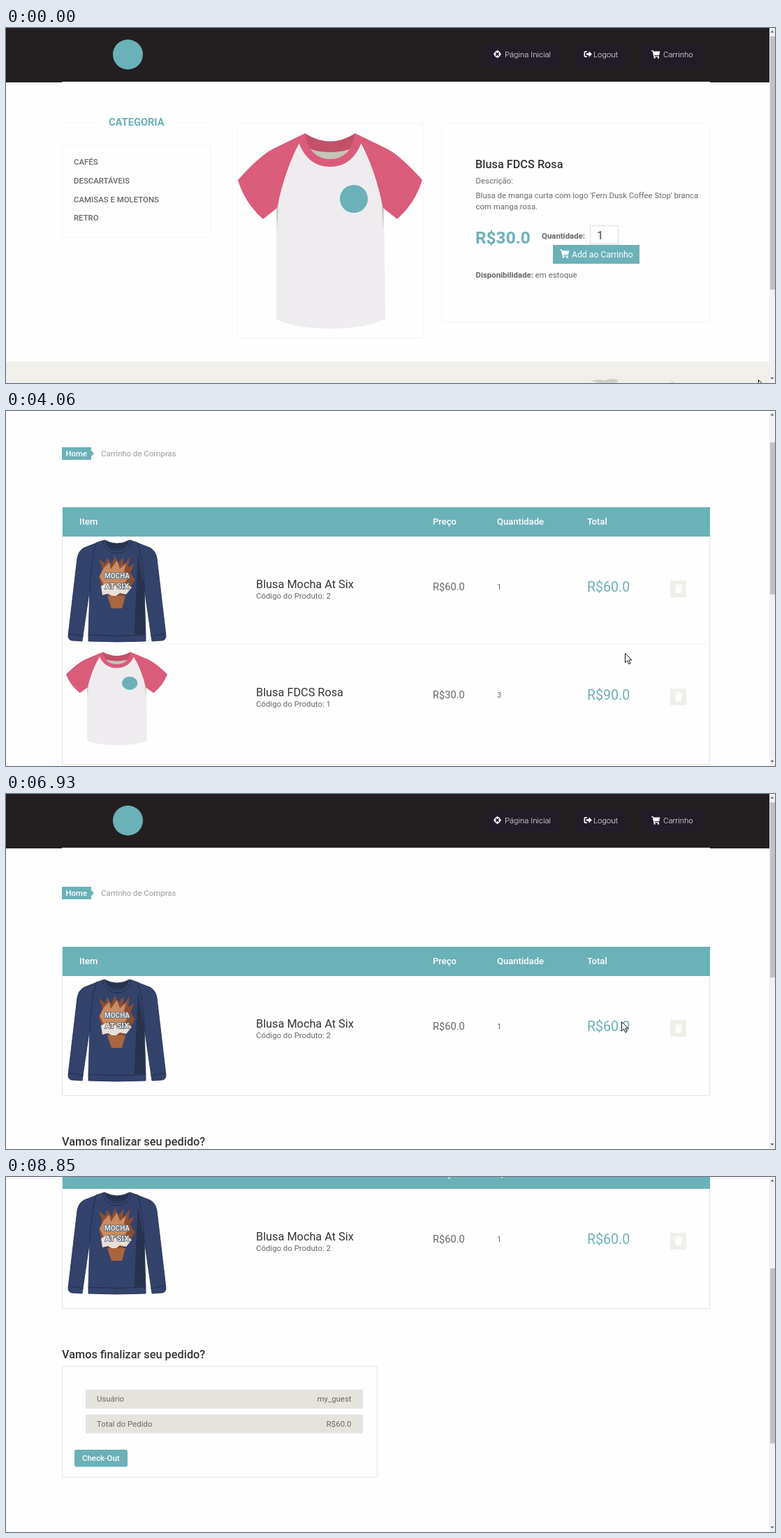
An HTML page that plays this animation: 1101 by 509 pixels, repeating every 9.29 s.

```html
<!DOCTYPE html>
<html lang="pt-BR">
<head>
<meta charset="utf-8">
<title>Carrinho de Compras</title>
<style>
html, body { margin: 0; width: 100%; height: 100%; overflow: hidden; background: #fefefe; }
svg { position: absolute; left: 0; top: 0; display: block; }
text { font: 400 11.41px Roboto, sans-serif; fill: #696763; white-space: pre; }
.m { font-weight: 500; }
.b { font-weight: 700; }
.h2 { font-size: 16.3px; fill: #363432; }
.th { font: 500 13.04px Roboto, sans-serif; fill: #fff; }
.price { font-size: 14.67px; }
.sum { font-size: 19.56px; fill: #6bb1b8; }
.qty { font: 500 16.3px Roboto, sans-serif; }
.nav text { font-weight: 300; fill: #fff; }
.w { fill: #fff; }
.e { text-anchor: end; }
.line { fill: none; stroke: #f5f5f2; }
.frame { fill: none; stroke: #e6e4e0; }
.teal { fill: #6bb1b8; }

/* timeline: 1% = 92.9 ms */
.t { animation: 9290ms step-end infinite; }
#page { animation-name: scroll; }
#shop { animation-name: shop; }
#cart { animation-name: cart; }
.two { animation-name: two; }
.one { animation-name: one; }
#below { animation-name: below; }
#v1 { animation-name: v1; }
#v2 { animation-name: v2; }
#v3 { animation-name: v3; }
#caret { animation-name: caret; }
#spin { animation-name: spin; }
#add { animation-name: add; }
#add text { fill: inherit; font-size: 12.22px; }
#del { animation-name: del; }
#thumb { animation-name: thumb; }
#arrow { animation-name: arrow; }
#hand { animation-name: hand; }
#cursor { animation: move 9290ms linear infinite; }

@keyframes shop { 0% { opacity: 1 } 37.67%, 100% { opacity: 0 } }
@keyframes cart { 0% { opacity: 0 } 37.67%, 100% { opacity: 1 } }
@keyframes two { 0% { opacity: 1 } 67.92%, 100% { opacity: 0 } }
@keyframes one { 0% { opacity: 0 } 67.92%, 100% { opacity: 1 } }
@keyframes below { 0% { transform: translateY(155px) } 67.92%, 100% { transform: none } }
@keyframes v1 { 0% { opacity: 1 } 13.13%, 100% { opacity: 0 } }
@keyframes v2 { 0%, 14.1%, 100% { opacity: 0 } 13.13% { opacity: 1 } }
@keyframes v3 { 0% { opacity: 0 } 14.1%, 100% { opacity: 1 } }
@keyframes caret { 0%, 23.5%, 100% { opacity: 0 } 13.13% { opacity: 1 } }
@keyframes spin { 0%, 27.87%, 100% { opacity: 0 } 9% { opacity: 1 } }
@keyframes add { 0%, 100% { fill: #fff } 24.5% { fill: #333 } }
@keyframes del { 0%, 67.92%, 100% { fill: #f0efe9 } 66% { fill: #6bb1b8 } }
@keyframes hand { 0%, 35.62%, 67.92%, 100% { opacity: 0 } 24.5%, 66% { opacity: 1 } }
@keyframes arrow { 0%, 35.62%, 67.92% { opacity: 1 } 24.5%, 66%, 95.26%, 100% { opacity: 0 } }
@keyframes scroll {
  0%, 67.92%, 100% { transform: none }
  43.7%, 78.68% { transform: translateY(-81px) }
  44.34%, 79.11% { transform: translateY(-163px) }
  48.11%, 79.97% { transform: translateY(-244px) }
  49.4% { transform: translateY(-300px) }
  51.23% { transform: translateY(-325px) }
  79.54% { transform: translateY(-220px) }
}
@keyframes thumb {
  0%, 100% { y: 12px; height: 363px }
  37.67% { y: 12px; height: 218px }
  43.7% { y: 45px; height: 218px }
  44.34% { y: 80px; height: 218px }
  48.11% { y: 114px; height: 218px }
  49.4% { y: 138px; height: 218px }
  51.23% { y: 149px; height: 218px }
  67.92% { y: 12px; height: 251px }
  78.68% { y: 51px; height: 251px }
  79.11% { y: 91px; height: 251px }
  79.54% { y: 119px; height: 251px }
  79.97% { y: 131px; height: 251px }
}
@keyframes move {
  0% { transform: translate(1077px, 504px) }
  .42% { transform: translate(1076px, 503px) }
  3.5% { transform: translate(1002px, 408px) }
  6.4% { transform: translate(908px, 312px) }
  8.6% { transform: translate(873px, 281px) }
  10.33%, 11.18% { transform: translate(867px, 287px) }
  11.19%, 17% { transform: translate(868px, 288px) }
  18.8% { transform: translate(876px, 280px) }
  21.2%, 21.6% { transform: translate(891px, 288px) }
  23.2% { transform: translate(893px, 303px) }
  26.48%, 30.2% { transform: translate(886px, 326px) }
  32.62%, 35.6% { transform: translate(886px, 340px) }
  36.16%, 46.06% { transform: translate(886px, 347px) }
  46.07%, 57.5% { transform: translate(952px, 392px) }
  60% { transform: translate(955px, 342px) }
  64% { transform: translate(961px, 215px) }
  67.38%, 67.91% { transform: translate(958px, 162px) }
  70% { transform: translate(929px, 234px) }
  72.5% { transform: translate(894px, 308px) }
  74.59%, 92.2% { transform: translate(881px, 326px) }
  93.4% { transform: translate(934px, 377px) }
  95.25%, 99.9% { transform: translate(1062px, 502px) }
  100% { transform: translate(1077px, 504px) }
}
</style>
</head>
<body>
<svg width="1101" height="509" viewBox="0 0 1101 509">
  <defs>
    <g id="trolley">
      <path d="M0 0h2.7l.5 1.7H13.4L12 7.4H4.5l.3 1.3h6.9v1.2H3.7L1.8 1.3H0z"/>
      <circle cx="4.9" cy="11.3" r="1.3"/><circle cx="10.7" cy="11.3" r="1.3"/>
    </g>
    <g id="can" fill="#fff">
      <path d="M957 330.500h3.500l1-1.200h2.500l1 1.200h3.500v1.600h-11.500zM958 333h9.500l-.6 9.300h-8.300z"/>
    </g>
    <g id="tee">
      <path fill="#c5c4ba" d="M430 158Q464 168 498 158Q488 190 464 190T430 158z"/>
      <path fill="#c25069" d="M428 151Q464 174 500 151L507 163Q495 178 464 178T421 163z"/>
      <path fill="#eeecef" d="M421 162Q432 198 464 199T507 162Q529 208 541 260L543 417Q515 431 464 431T387 417V260Q398 208 421 162z"/>
      <path fill="#cbc9c3" d="M387 259l1 30 3-46zM541 259l-1 30-3-46z"/>
      <path id="sleeve" fill="#da5c7b" d="M428 151L385 172Q365 181 332 218Q342 251 368 274L388 258Q400 201 421 163z"/>
      <use href="#sleeve" transform="matrix(-1 0 0 1 928 0)"/>
      <path fill="#da5c7b" d="M428 151L419 164Q432 199 464 199T509 164L500 151Q493 188 464 188T428 151z"/>
      <circle class="teal" cx="498" cy="245" r="20"/>
    </g>
    <g id="sweater">
      <g stroke="#1e2947" stroke-width=".8">
        <path id="arm" fill="#34436c" d="M130 270L112 277Q104 281 102 292L89 403Q89 409 94 410L109 411L120 335z"/>
        <use href="#arm" transform="matrix(-1 0 0 1 318 0)"/>
        <path fill="#34436c" d="M141 266Q159 276 177 266L189 270Q197 300 198 335L200 402V411Q159 413 118 411V402L120 335Q121 300 129 270z"/>
        <path fill="none" d="M118 402Q159 405 200 402M90 400l21 4M228 400l-21 4M138 267Q142 285 159 285T180 267M142 267Q146 281 159 281T176 267"/>
      </g>
      <path fill="#28324f" d="M189 285Q186 335 184 401L199 402L198 335zM142 267Q159 275 176 267Q173 279 159 279T142 267z"/>
      <path fill="#8a4f31" d="M133 320l5-13-5-14 9 7 3-9 6 10 5-13 4 12 8-10 0 13 9-13-2 15 9-5-6 13 7 10-8 12-9 10-5 18H151l-4-18-9-10z"/>
      <path fill="#c98b62" d="M140 306l8-8 2 10 9-13 4 12 9-8-3 12 8 6-8 12-9 5-10 4-10-8-6-12z"/>
      <path fill="#eadfd5" d="M136 332l8-4 5 8 8-5 7 6 9-8 7 5-8 10-9-2-8 6-9-5-8 2z"/>
      <path fill="#a9653f" d="M145 346h26l-5 18H151z"/>
      <g font-weight="700" stroke="#4d6273" stroke-width="1.600" paint-order="stroke" text-anchor="middle">
        <text x="159" y="321" style="font-size:10px;font-weight:700;fill:#e8eef0">MOCHA</text>
        <text x="159" y="336" style="font-size:11.500px;font-weight:700;fill:#e8eef0">AT SIX</text>
      </g>
    </g>
  </defs>

  <rect width="1101" height="509" fill="#fefefe"/>
  <g id="page" class="t">
    <rect width="1093" height="78" fill="#231f20"/>
    <rect x="80" y="77" width="928" height="1" fill="#fff"/>
    <circle class="teal" cx="174.500" cy="38" r="21.500"/>
    <g class="nav" fill="#fff">
      <path fill="#211c27" d="M687 22h106v33H687zM815 22h74v33H815zM912 22h84v33H912z"/>
      <circle cx="703.500" cy="37.500" r="3.800" fill="none" stroke="#fff" stroke-width="1.700"/>
      <path d="M702.800 32h1.500v4h-1.500zM702.800 39h1.500v4h-1.500zM698 36.800h4v1.500h-4zM705 36.800h4v1.500h-4z"/>
      <path d="M832 33h-2.500q-2 0-2 2v5q0 2 2 2h2.500v-1.600h-2q-.8 0-.8-.8v-4.200q0-.8.8-.8h2zM831 36h3.500v-2.700l4.500 4.200-4.500 4.200V39H831z"/>
      <use href="#trolley" transform="translate(924 32) scale(.93)"/>
      <text x="714" y="41.500">Página Inicial</text>
      <text x="841" y="41.500">Logout</text>
      <text x="941" y="41.500">Carrinho</text>
    </g>

    <g id="shop" class="t">
      <path class="line" d="M80 135.500h55M240 135.500h54M80.500 168.500h213v132h-213zM331.500 136.500h266v308h-266zM623.500 136.500h384v285h-384z"/>
      <text x="147" y="140.300" class="b" style="font-size:14.67px;fill:#6bb1b8">CATEGORIA</text>
      <g class="m">
        <text class="m" x="97" y="196">CAFÉS</text>
        <text class="m" x="97" y="223">DESCARTÁVEIS</text>
        <text class="m" x="97" y="250">CAMISAS E MOLETONS</text>
        <text class="m" x="97" y="276">RETRO</text>
      </g>
      <use href="#tee"/>
      <text class="h2 m" x="672" y="200.500">Blusa FDCS Rosa</text>
      <text x="672.500" y="223">Descrição:</text>
      <text x="672.500" y="243.500">Blusa de manga curta com logo 'Fern Dusk Coffee Stop' branca</text>
      <text x="672.500" y="260">com manga rosa.</text>
      <text x="672" y="308.500" class="b" style="font-size:24.45px;fill:#6bb1b8">R$30.0</text>
      <text class="b" x="767" y="302">Quantidade:</text>
      <rect x="836.500" y="283.500" width="40" height="26" fill="#fff" stroke="#deded9"/>
      <text id="v1" class="qty t" x="846" y="302.500">1</text>
      <text id="v2" class="qty t" x="846" y="302.500">2</text>
      <text id="v3" class="qty t" x="846" y="302.500">3</text>
      <rect id="caret" class="t" x="855" y="287" width="1" height="19" fill="#444"/>
      <g id="spin" class="t">
        <rect x="863" y="287" width="12" height="19" fill="#efefef"/>
        <path fill="#444" d="M866 294.500h6l-3-3zM866 300h6l-3 3z"/>
      </g>
      <rect class="teal" x="783" y="311" width="124" height="27"/>
      <g id="add" class="t">
        <use href="#trolley" transform="translate(793 317.500)"/>
        <text x="810" y="328.500">Add ao Carrinho</text>
      </g>
      <text x="672.500" y="357.500"><tspan class="b">Disponibilidade:</tspan> em estoque</text>
      <rect y="478" width="1093" height="40" fill="#f0efea"/>
      <path fill="#d0cec9" d="M838 506l10-2 8 1 12-2 6 1 3 3-6 3h-20zM951 509l3-2 3 2z"/>
    </g>

    <g id="cart" class="t">
      <path class="teal" d="M80 133h42v5l4 4-4 4v5H80z"/>
      <text class="m w" x="85.500" y="146" style="fill:#fff">Home</text>
      <text x="136" y="146" style="fill:#999">Carrinho de Compras</text>
      <path class="one t frame" d="M80.500 219.500h927v213h-927z"/>
      <rect class="teal" x="81" y="219" width="927" height="42"/>
      <text class="th" x="105" y="243.500">Item</text>
      <text class="th" x="611" y="243.500">Preço</text>
      <text class="th" x="703" y="243.500">Quantidade</text>
      <text class="th" x="832" y="243.500">Total</text>

      <use href="#sweater"/>
      <text class="h2" x="358" y="335">Blusa Mocha At Six</text>
      <text x="358" y="350">Código do Produto: 2</text>
      <text class="price" x="611" y="338">R$60.0</text>
      <text x="703" y="337">1</text>
      <text class="sum" x="832" y="339.500">R$60.0</text>
      <rect x="951" y="324" width="23" height="24" fill="#f0efe9"/>
      <use href="#can"/>

      <g class="two t">
        <path class="frame" d="M80.500 261V587.500h927V261"/>
        <path class="line" d="M81 415.500h926"/>
        <g transform="translate(86 426.500) scale(.549 .477) translate(-332 -151)"><use href="#tee"/></g>
        <g transform="translate(0 155)">
          <text class="h2" x="358" y="335">Blusa FDCS Rosa</text>
          <text x="358" y="350">Código do Produto: 1</text>
          <text class="price" x="611" y="338">R$30.0</text>
          <text x="703" y="337">3</text>
          <text class="sum" x="832" y="339.500">R$90.0</text>
          <rect id="del" class="t" x="951" y="324" width="23" height="24"/>
          <use href="#can"/>
        </g>
      </g>

      <g id="below" class="t">
        <text class="h2 m" x="80" y="504">Vamos finalizar seu pedido?</text>
        <path class="frame" d="M80.500 515.500h451v159h-451z"/>
        <path fill="#e5e3de" d="M114 549h397v27H114zM114 584.500h397v27H114z"/>
        <text x="130" y="566">Usuário</text>
        <text class="e" x="494.500" y="566">my_guest</text>
        <text x="130" y="601.500">Total do Pedido</text>
        <text class="two t e" x="494.500" y="601.500">R$150.0</text>
        <text class="one t e" x="494.500" y="601.500">R$60.0</text>
        <rect class="teal" x="98" y="635" width="76" height="24.500" rx="3"/>
        <text class="m" x="109" y="650.500" style="fill:#fff">Check-Out</text>
      </g>
    </g>
  </g>

  <rect x="1093" width="8" height="509" fill="#f1f1f1"/>
  <path fill="#666" d="M1094.500 6.500h5l-2.500-3zM1094.500 501h5l-2.500 3z"/>
  <rect id="thumb" class="t" x="1094" y="12" width="7" height="363" fill="#c1c1c1"/>

  <g id="cursor" fill="#fff" stroke="#111" stroke-linejoin="round">
    <path id="arrow" class="t" d="M.5.5V13.800L3.600 10.900 5.800 15.800 8 14.800 5.800 10H9.800z"/>
    <path id="hand" class="t" d="M-1.500 10V1Q-1.500-.5 0-.5T1.500 1V6Q3.500 4.800 4.300 6.500 6 5.800 6.800 7.300 9.200 7 9.200 9V12Q9.200 14 7.500 17.500H-.5Q-2 14.500-5 11.500-6 9.500-4 9-2.800 8.800-1.500 10z"/>
  </g>
</svg>
</body>
</html>
```
